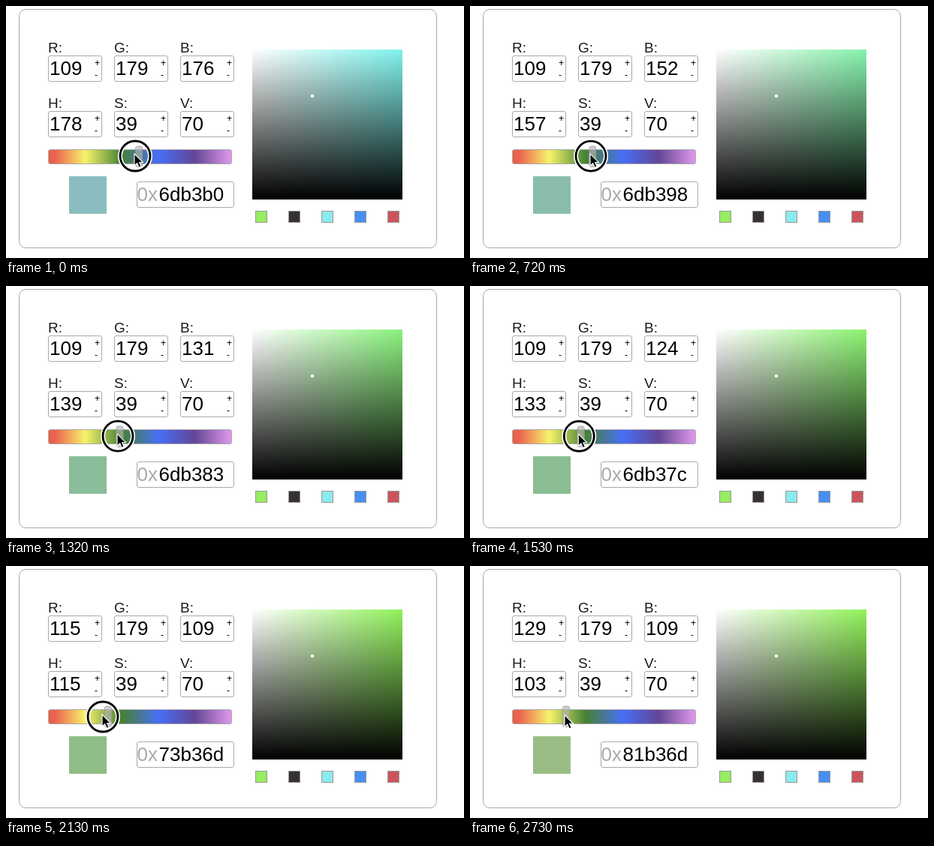
These frames come from a looping animation (610 px wide and 336 px high, 2.79 s). An HTML page:

```html
<!DOCTYPE html>
<html lang="en">
<head>
<meta charset="utf-8">
<title>Color picker</title>
<style>
  html, body { margin: 0; width: 100%; height: 100%; overflow: hidden; background: #fff; }
  svg { display: block; width: 610px; height: 336px; font-family: "Liberation Sans", Arial, sans-serif; }
  .box { fill: #fff; stroke: #a9a9a9; }
  .label { font-size: 19px; fill: #1c1c1c; }
  .value { font-size: 26px; fill: #000; }
  .step { font-size: 12px; fill: #000; }
</style>
</head>
<body>
<svg viewBox="0 0 610 336" xmlns="http://www.w3.org/2000/svg">
  <defs>
    <linearGradient id="rainbow">
      <stop offset="0" stop-color="#eb5d4a"/>
      <stop offset=".04" stop-color="#eb644e"/>
      <stop offset=".2" stop-color="#f8f46c"/>
      <stop offset=".4" stop-color="#468134"/>
      <stop offset=".6" stop-color="#486ff6"/>
      <stop offset=".8" stop-color="#634596"/>
      <stop offset="1" stop-color="#e29aec"/>
    </linearGradient>
    <linearGradient id="saturation">
      <stop offset="0" stop-color="#fff"/>
      <stop id="pure" offset="1"/>
    </linearGradient>
    <linearGradient id="shade" x2="0" y2="1">
      <stop offset="0" stop-opacity="0"/>
      <stop offset="1"/>
    </linearGradient>
  </defs>
  <rect width="610" height="336" fill="#fff"/>
  <rect class="box" x="17.5" y="4.5" width="556" height="318" rx="9"/>
  <g id="fields"></g>

  <rect x="56.5" y="191.5" width="244" height="19" rx="2.5" fill="url(#rainbow)" stroke="#a9a9a9"/>
  <rect id="thumb" x="-4.5" y="187" width="9" height="27.5" rx="2.5" fill="#b4b4b4" fill-opacity=".65" stroke="#999" stroke-opacity=".8"/>

  <rect id="preview" x="84" y="227" width="50" height="50"/>
  <rect class="box" x="174.5" y="234.5" width="129" height="34" rx="2.5"/>
  <text class="value" x="174.5" y="260" style="fill:#aaa">0x</text>
  <text class="value" id="hex" x="203.5" y="260"></text>

  <rect x="328" y="58" width="200" height="200" fill="url(#saturation)"/>
  <rect x="328" y="58" width="200" height="200" fill="url(#shade)"/>
  <circle cx="408" cy="120" r="2.2" fill="#fff"/>
  <g id="palette"></g>

  <g id="pointer">
    <g id="ring" fill="none">
      <circle r="20" stroke="#fff" stroke-width="6"/>
      <circle r="20" stroke="#000" stroke-width="2.8"/>
    </g>
    <path d="M-1-3V13L2.7 9.6L5.2 15.4L8.1 14.1L5.6 8.5H10.5Z" fill="#000" stroke="#fff" stroke-width="1.1"/>
  </g>
</svg>
<script>
const LOOP = 2790, STEP = 30, RELEASE = 2640;
const SAT = .39, VAL = .7;

// [time, value] pairs
const HUE = [[0, 178], [240, 170], [720, 157], [1320, 139], [1770, 127], [2130, 115], [2460, 103]];
const MOUSE_X = [[0, 172], [240, 166], [720, 161], [1320, 149], [1770, 141], [2130, 129], [2280, 127]];
const MOUSE_Y = [[0, 200], [1770, 200.3], [2130, 201], [2400, 201.5]];

const el = id => document.getElementById(id);
const move = (id, x, y) => el(id).setAttribute('transform', `translate(${x} ${y})`);
const css = rgb => `rgb(${rgb.map(Math.round)})`;

function track(keys, t) {
  const i = keys.findIndex(k => k[0] > t);
  if (i < 0) return keys[keys.length - 1][1];
  const [t0, a] = keys[i - 1], [t1, b] = keys[i];
  return a + (b - a) * (t - t0) / (t1 - t0);
}

function hsv(h, s, v) {
  return [5, 3, 1].map(n => {
    const k = (n + h / 60) % 6;
    return v * (1 - s * Math.max(0, Math.min(k, 4 - k, 1)));
  });
}

// Muted screen rendition of the selected colour and of its pure hue
const soften = ([r, g, b]) => [51 + .8 * r, 26 + .91 * g, 40 + .86 * b];
const vivid = ([r, , b]) => [143 - 18 * b + 10 * r, 242, 90 + 152 * b ** 1.3];

function field(name, i) {
  const x = 56 + i % 3 * 88, y = i < 3 ? 66 : 140;
  return `<text class="label" x="${x}" y="${y - 4}">${name}:</text>
    <rect class="box" x="${x + .5}" y="${y + .5}" width="71" height="34" rx="2.5"/>
    <text class="value" id="${name}" x="${x + 2}" y="${y + 26}"></text>
    <text class="step" x="${x + 62}" y="${y + 14}">+</text>
    <text class="step" x="${x + 62}" y="${y + 30}">-</text>`;
}

el('fields').innerHTML = [...'RGBHSV'].map(field).join('');
el('palette').innerHTML = ['#96ec62', '#362f33', '#8aebee', '#4690f4', '#cc555d'].map((c, i) =>
  `<rect x="${332.5 + i * 44}" y="273.5" width="15" height="15" fill="${c}" stroke="#999"/>`).join('');

function draw(time) {
  const t = Math.floor(time % LOOP / STEP) * STEP;
  const hue = Math.round(track(HUE, t));
  const rgb = hsv(hue, SAT, VAL).map(c => Math.round(c * 255));

  [...rgb, hue, SAT * 100, VAL * 100].forEach((v, i) => {
    el('RGBHSV'[i]).textContent = Math.round(v);
  });
  el('hex').textContent = rgb.map(c => c.toString(16).padStart(2, '0')).join('');
  el('preview').setAttribute('fill', css(soften(rgb)));
  el('pure').setAttribute('stop-color', css(vivid(hsv(hue, 1, 1))));

  move('thumb', 60.8 + hue * .653, 0);
  move('pointer', track(MOUSE_X, t), track(MOUSE_Y, t));
  el('ring').style.display = t < RELEASE ? '' : 'none';
}

const start = performance.now();
function tick() {
  draw(performance.now() - start);
  requestAnimationFrame(tick);
}
tick();
</script>
</body>
</html>
```
